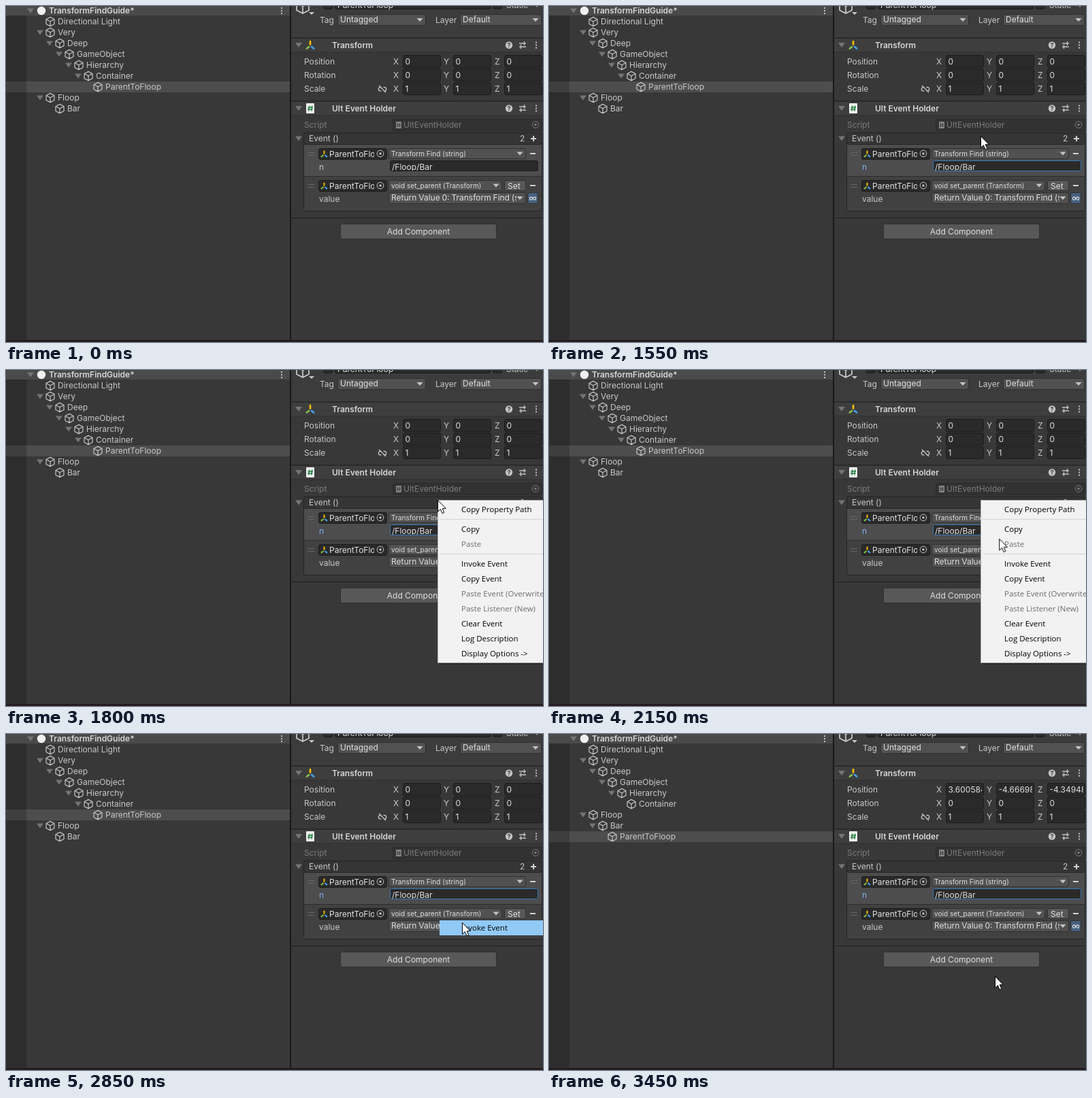
Animation, 789 px wide and 494 px high, one loop 4300 ms. Source, as an HTML page:

```html
<!DOCTYPE html>
<html lang="en">
<head>
<meta charset="utf-8">
<title>Inspector event demo</title>
<style>
  html, body { margin: 0; width: 100%; height: 100%; overflow: hidden; background: #383838; }
  #stage { display: block; font: 12px Inter, sans-serif; fill: #c8c8c8; }
  #stage text { white-space: pre; }
  .bold { font-weight: 600; fill: #d6d6d6; }
  .small { font-size: 10px; letter-spacing: .05px; }
  .tight { word-spacing: -.5px; }
  .light { fill: #e0e0e0; }
  .dim { fill: #7c7c7c; }
  .line { fill: none; stroke: #c4c4c4; }
  .menu text, .ghost text { font: 11.5px "Open Sans", "Noto Sans", sans-serif; fill: #000; }
  .menu text.off { fill: #6d6d6d; }

  /* 50 ms of the 4300 ms loop is 1.1628 % */
  .before, .after, .focus, .hover, .menu, .ghost, .hl-path, .hl-copy, .hl-invoke, #cursor {
    animation: 4300ms -4ms infinite step-end;
  }
  .before { animation-name: before; }
  .after { animation-name: after; }
  .focus { animation-name: focus; }
  .hover { animation-name: hover; }
  .menu { animation-name: menu; }
  .ghost { animation-name: ghost; }
  .hl-path { animation-name: hl-path; }
  .hl-copy { animation-name: hl-copy; }
  .hl-invoke { animation-name: hl-invoke; }
  #cursor { animation-name: cursor; }

  @keyframes before { 0% { opacity: 1 } 67.442%, 100% { opacity: 0 } }
  @keyframes after { 0% { opacity: 0 } 67.442%, 100% { opacity: 1 } }
  @keyframes focus { 0% { opacity: 0 } 34.884%, 100% { opacity: 1 } }
  @keyframes hover { 0% { opacity: 0 } 26.744% { opacity: 1 } 27.907%, 100% { opacity: 0 } }
  @keyframes hl-path { 0% { opacity: 0 } 46.512% { opacity: 1 } 47.674%, 100% { opacity: 0 } }
  @keyframes hl-copy { 0% { opacity: 0 } 48.837% { opacity: 1 } 50%, 100% { opacity: 0 } }
  @keyframes hl-invoke { 0% { opacity: 0 } 55.814%, 100% { opacity: 1 } }
  @keyframes menu {
    0% { opacity: 0 }
    37.209% { opacity: 0; animation-timing-function: steps(4) }
    41.86% { opacity: 1 }
    66.279%, 100% { opacity: 0 }
  }
  @keyframes ghost {
    0% { opacity: 0 }
    66.279% { opacity: 1; animation-timing-function: steps(5) }
    72.093%, 100% { opacity: 0 }
  }
  @keyframes cursor {
    0% { transform: translate(-40px, 0) }
    22.093% { transform: translate(765px, 319px); animation-timing-function: steps(4) }
    26.744% { transform: translate(675px, 230px); animation-timing-function: steps(6) }
    33.721% { transform: translate(634px, 191px) }
    45.349% { transform: translate(634px, 191px); animation-timing-function: steps(5) }
    51.163% { transform: translate(668px, 262px); animation-timing-function: steps(5) }
    56.977% { transform: translate(674px, 276px) }
    59.302% { transform: translate(670px, 277px) }
    70.93% { transform: translate(670px, 277px); animation-timing-function: steps(6) }
    77.907% { transform: translate(604px, 331px); animation-timing-function: steps(2) }
    80.233%, 100% { transform: translate(655px, 356px) }
  }
</style>
</head>
<body>
<svg id="stage" width="789" height="494" viewBox="0 0 789 494"></svg>
<script>
const rect = (x, y, w, h, fill, extra = '') =>
  `<rect x="${x}" y="${y}" width="${w}" height="${h}" fill="${fill}" ${extra}/>`;
const text = (x, y, s, cls = '') => `<text x="${x}" y="${y}" class="${cls}">${s}</text>`;
const path = (d, extra = 'class="line"') => `<path d="${d}" ${extra}/>`;
const at = (x, y, body) => `<g transform="translate(${x} ${y})">${body}</g>`;
const group = (cls, body) => `<g class="${cls}">${body}</g>`;
const clip = (x, y, w, h, body) => `<svg x="${x}" y="${y}" width="${w}" height="${h}">${body}</svg>`;
// rounded box with a crisp 1px border
const box = (x, y, w, h, fill, stroke, r = 2.5) =>
  rect(x + .5, y + .5, w - 1, h - 1, fill, `stroke="${stroke}" rx="${r}"`);

// icons
const fold = (x, y) => path(`M${x - 5} ${y - 3.5}h10l-5 7z`, 'fill="#747474"');
const arrow = (x, y) => path(`M${x - 4.5} ${y - 2.5}h9l-4.5 5z`, 'fill="#c4c4c4"');
const cube = (x, y, k = 1) => at(x, y,
  `<g transform="scale(${k})">${path('M0-6.6L6-3.5V3.5L0 6.6L-6 3.5V-3.5ZM-6-3.5L0-.3L6-3.5M0-.3V6.6',
    'class="line" stroke-width="1.2" stroke-linejoin="round"')}</g>`);
const dots = (x, y) => [-4, 0, 4].map(d => rect(x - 1, y + d - 1, 2, 2, '#c4c4c4')).join('');
const axes = (x, y, k) => at(x, y, `<g transform="scale(${k})" stroke-linecap="round" stroke-width="2.6">
  <path d="M0-6V-1.5" stroke="#ffc107"/><path d="M-5.2 4.5L-2 2" stroke="#8bc34a"/>
  <path d="M5.2 4.5L2 2" stroke="#42a5f5"/></g>`);
const picker = (x, y, color = '#c4c4c4') =>
  `<circle cx="${x}" cy="${y}" r="4.8" fill="none" stroke="${color}"/><circle cx="${x}" cy="${y}" r="1.7" fill="${color}"/>`;
const tools = y => `<circle cx="739" cy="${y}" r="5.2" fill="#c4c4c4"/>
  <text x="739" y="${y + 3.3}" text-anchor="middle" style="font:700 9px Inter,sans-serif;fill:#3e3e3e">?</text>
  ${path(`M754 ${y - 2.5}h10M754 ${y + 2.5}h10M761.5 ${y - 5.5}v6M756.5 ${y - .5}v6`, 'class="line" stroke-width="1.3"')}
  ${dots(779, y)}`;
const minus = y => rect(770, y - 1, 8, 2, '#d0d0d0');

// controls
const drop = (x, y, w, s, cls = 'light', h = 17) => box(x, y, w, h, '#515151', '#303030') +
  clip(x + 4, y, w - 18, h, text(0, 12, s, cls)) + arrow(x + w - 9, y + h / 2);
const field = (x, y, w, h) => box(x, y, w, h, '#2a2a2a', '#1c1c1c');
const value = (x, y, s) => clip(x + 3, y - 9, 50, 18, text(.5, 13, s, 'light'));
const treeRow = (depth, line, name, open) => {
  const x = 14 * depth, y = 7 + 16 * line;
  return (open ? fold(50 + x, y) : '') + cube(65 + x, y) + text(76 + x, y + 4, name);
};
const selected = line => rect(0, 16 * line - 1, 417, 16, '#4d4d4d') + rect(0, 16 * line - 1, 30, 16, '#3e3e3e');

function hierarchy() {
  return rect(0, 0, 417, 491, '#383838') + rect(0, 0, 30, 491, '#2d2d2d') +
    rect(0, 0, 417, 14, '#4a4a4a') +
    fold(36, 7) + '<circle cx="52" cy="7" r="6.2" fill="#f0f0f0"/>' +
    text(63, 11, 'TransformFindGuide*', 'bold') + dots(405, 7) +
    group('before', selected(7)) + group('after', selected(9)) +
    treeRow(0, 1, 'Directional Light') +
    ['Very', 'Deep', 'GameObject', 'Hierarchy'].map((s, i) => treeRow(i, i + 2, s, true)).join('') +
    treeRow(4, 6, 'Container') +
    group('before', fold(106, 103) + treeRow(5, 7, 'ParentToFloop') +
      treeRow(0, 8, 'Floop', true) + treeRow(1, 9, 'Bar')) +
    group('after', treeRow(0, 7, 'Floop', true) + treeRow(1, 8, 'Bar', true) +
      treeRow(2, 9, 'ParentToFloop'));
}

function objectHeader() {
  return rect(419, 0, 370, 47, '#3c3c3c') + cube(436, 1, 1.5) + path('M445 9h8l-4 4z', 'fill="#c4c4c4"') +
    field(466, -9, 14, 14) + field(483, -13, 229, 18) + text(487, 3, 'ParentToFloop', 'light') +
    field(715, -9, 14, 14) + text(735, 3, 'Static') + arrow(780, -1) +
    text(461, 25, 'Tag') + drop(487, 12, 130, 'Untagged') +
    text(631, 25, 'Layer') + drop(667, 12, 120, 'Default');
}

function header(y, title) {
  return rect(419, y - 11, 370, 21, '#3e3e3e') + rect(419, y - 11, 370, 1, '#1a1a1a') +
    rect(419, y + 10, 370, 1, '#303030') + fold(430, y) + text(479, y + 4.5, title, 'bold') + tools(y);
}

function transform() {
  const cols = [583, 657, 732];
  const moved = ['3.600584', '-4.66698', '-4.349482'];
  const rows = ['Position', 'Rotation', 'Scale'].map((name, r) => {
    const y = 82 + 20 * r;
    return text(438, y + 4, name) + cols.map((x, c) => {
      const base = value(x, y, r === 2 ? '1' : '0');
      return text(x - 14, y + 4, 'XYZ'[c]) + field(x, y - 10, 56, 19) +
        (r ? base : group('before', base) + group('after', value(x, y, moved[c])));
    }).join('');
  });
  const link = at(553, 122, path('M-1.5-2.5H-3a2.7 2.7 0 0 0 0 5.4h1.5M1.5-2.5H3a2.7 2.7 0 0 1 0 5.4H1.5M-5-5L5 5',
    'class="line" stroke-width="1.3"'));
  return header(57.5, 'Transform') + axes(447, 58, 1) + rows.join('') + link;
}

function listener(y, method, width) {
  return path(`M443 ${y - 1.5}h10M443 ${y + 2.5}h10`, 'fill="none" stroke="#686868"') +
    field(459, y - 8, 101, 17) + axes(467.5, y + 1, .75) +
    clip(475, y - 8, 66, 17, text(0, 13, 'ParentToFloop', 'light')) + picker(550, y) +
    drop(562, y - 8, width, method, 'small light', 16) + minus(y);
}

function eventHolder() {
  return header(150.5, 'Ult Event Holder') +
    rect(441, 143, 12, 15, '#f0f0f0', 'rx="1"') +
    path('M445.8 146.5l-1 8M449.8 146.5l-1 8M443.5 149h7.5M443 152h7.5', 'fill="none" stroke="#1f7a3c" stroke-width="1.3"') +
    text(438, 179, 'Script', 'dim') + box(568, 166, 220, 18, '#323232', '#2a2a2a') +
    rect(573, 170, 8, 10, '#858585', 'rx="1"') +
    path('M575.8 172l-.6 6M578.8 172l-.6 6M574 174h6M574 176.3h6', 'fill="none" stroke="#3a3a3a" stroke-width=".8"') +
    text(584, 179, 'UltEventHolder', 'dim') + picker(778, 174.5, '#7c7c7c') +
    box(437, 186, 351, 116, '#414141', '#242424', 3) + box(437, 186, 351, 18, '#353535', '#242424', 3) +
    fold(430, 195) + text(445, 199, 'Event ()') + text(755, 199, '2') +
    minus(195).replace('770', '771') + rect(774, 191, 2, 8, '#d0d0d0') +
    rect(438, 204, 349, 46, '#4d4d4d') + rect(438, 250, 349, 1, '#2c2c2c') +
    listener(217, 'Transform Find (string)', 202) +
    text(460, 241, 'n') +
    group('focus', rect(459, 232, 10, 11, '#4d4d4d') + '<text x="460" y="241" fill="#7fb0f8">n</text>') +
    field(564, 227, 218, 16) +
    group('hover', box(564, 227, 218, 16, 'none', '#656565')) +
    group('focus', box(564, 227, 218, 16, 'none', '#3a79bb')) +
    clip(567, 228, 212, 14, text(0, 13, '/Floop/Bar', 'light')) +
    listener(264, 'void set_parent (Transform)', 167) +
    box(732, 256, 32, 16, '#585858', '#303030') + text(737, 269, 'Set', 'light') +
    text(460, 288, 'value') + drop(562, 274, 202, 'Return Value 0: Transform Find (string)', 'light tight') +
    box(766, 274, 16, 17, '#46607c', '#303030') +
    path('M774 283c-1.8-3.2-4.5-2.5-4.5 0s2.7 3.2 4.5 0s4.5-2.5 4.5 0s-2.7 3.2-4.5 0',
      'fill="none" stroke="#e4e4e4" stroke-width="1.2"');
}

function addButton() {
  return rect(419, 311, 370, 1, '#1f1f1f') + box(491, 320, 230, 23, '#585858', '#303030') +
    '<text x="606" y="336" text-anchor="middle" class="light">Add Component</text>';
}

const glow = y => rect(637, y, 152, 22, '#91c9f7');

function contextMenu() {
  const items = [[205, 'Copy Property Path'], [234, 'Copy'], [256, 'Paste', 'off'], [285, 'Invoke Event'],
    [307, 'Copy Event'], [329, 'Paste Event (Overwrite)', 'off'], [351, 'Paste Listener (New)', 'off'],
    [373, 'Clear Event'], [395, 'Log Description'], [417, 'Display Options -&gt;']];
  return rect(636, 193, 160, 240, '#000', 'opacity=".25"') +
    rect(634.5, 191.5, 170, 239, '#f2f2f2', 'stroke="#a8a8a8"') +
    rect(637, 219, 152, 1, '#d4d4d4') + rect(637, 270, 152, 1, '#d4d4d4') +
    group('hl-path', glow(194)) + group('hl-copy', glow(223)) + group('hl-invoke', glow(274)) +
    items.map(([y, s, cls]) => text(669, y + 4, s, cls)).join('');
}

document.getElementById('stage').innerHTML =
  rect(419, 0, 370, 491, '#383838') + hierarchy() +
  objectHeader() + transform() + eventHolder() + addButton() +
  rect(417, 0, 2, 491, '#191919') + rect(0, 491, 789, 3, '#251c20') +
  group('menu', contextMenu()) + group('ghost', glow(274) + text(669, 289, 'Invoke Event')) +
  `<g id="cursor">${path('M.5.5V17.3L4.4 13.7L7 19.8L9.8 18.6L7.2 12.7H12.3Z', 'fill="#fff" stroke="#000"')}</g>`;
</script>
</body>
</html>
```
